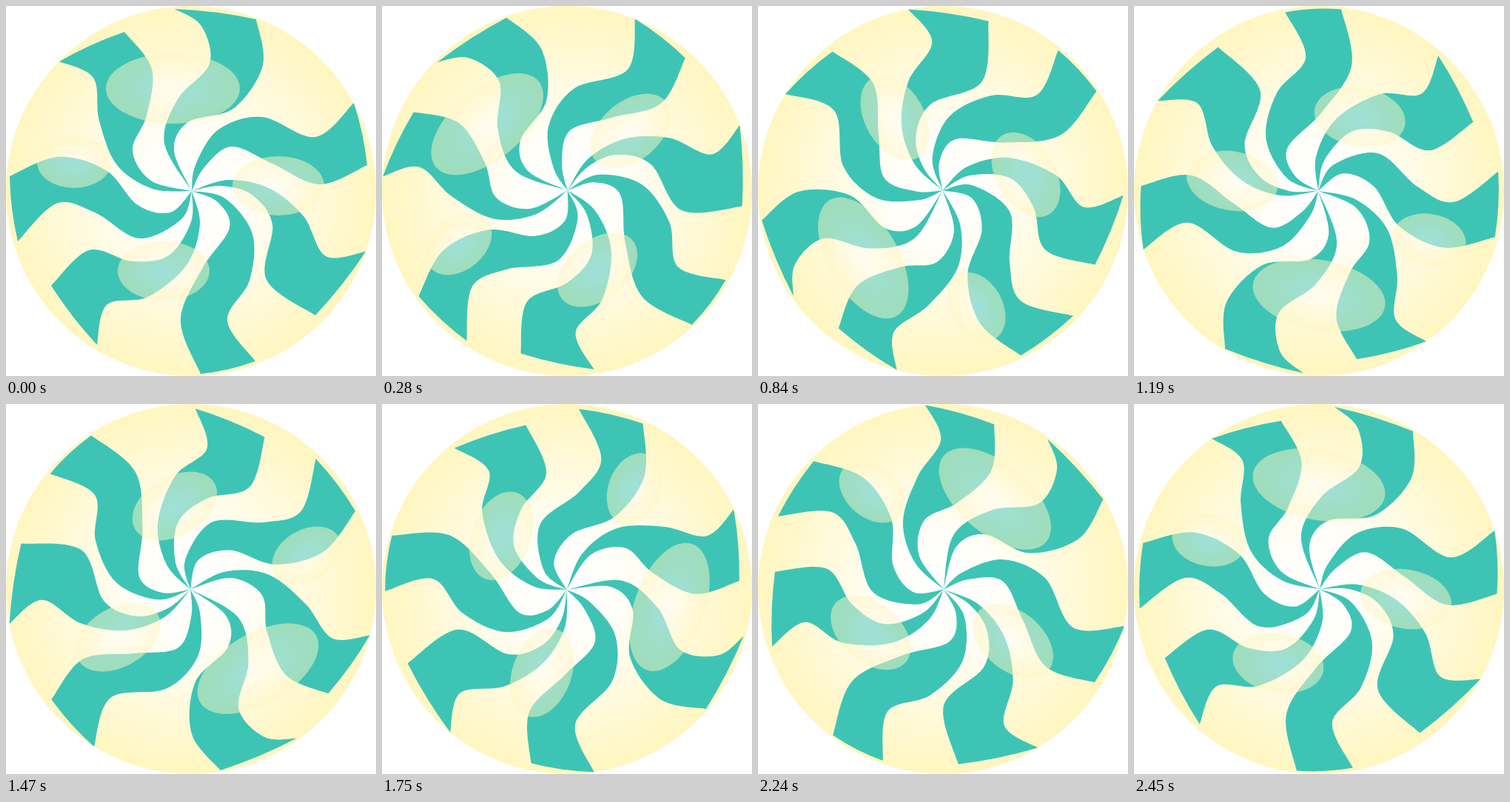
Recreate the animation shown at these times as an HTML page. Size 500 by 500 pixels, loop 2.52 s.

```html
<!DOCTYPE html>
<html lang="en">
<head>
<meta charset="utf-8">
<title>Spinning candy</title>
<style>
  html, body { margin: 0; width: 100%; height: 100%; overflow: hidden; background: #fff; }
  svg { display: block; width: 100vw; height: 100vh; }
</style>
</head>
<body>
<svg viewBox="0 0 500 500">
  <defs>
    <radialGradient id="cream">
      <stop offset="0" stop-color="#fff"/>
      <stop offset=".3" stop-color="#fffef8"/>
      <stop offset="1" stop-color="#fff6c0"/>
    </radialGradient>
    <radialGradient id="shine">
      <stop offset="0" stop-color="#fff"/>
      <stop offset="1" stop-color="#fff6c0"/>
    </radialGradient>
  </defs>
  <circle cx="250" cy="250" r="250" fill="url(#cream)"/>
  <g id="candy">
    <path id="swirl" fill="#3ec4b5"/>
    <g fill="url(#shine)" opacity=".5">
      <ellipse cx="225.500" cy="111.500" rx="90.500" ry="47.500"/>
      <ellipse cx="92" cy="211" rx="50" ry="35"/>
      <ellipse cx="368" cy="243" rx="62" ry="40"/>
      <ellipse cx="213" cy="358" rx="62" ry="40"/>
    </g>
  </g>
</svg>
<script>
  const FRAME_MS = 70, FRAMES = 36;
  const hub = [251, 250];

  // Two edges per stripe, each running from the rim towards the hub.
  const stripes = [
    ['228,4 264,27 275,78 232,126 214,185', '338,18 347,80 308,138 246,157 227,195'],
    ['72,75 118,97 126,155 150,215 198,247', '160,35 197,85 190,148 171,195 196,236'],
    ['5,230 70,204 135,222 178,269 222,279', '16,318 68,267 120,279 180,314 237,288'],
    ['61,378 112,330 170,345 220,337 250,292', '123,458 136,404 192,393 244,350 262,295'],
    ['263,497 236,425 265,355 302,300 286,265', '337,480 299,425 329,371 333,308 296,260'],
    ['418,418 352,370 360,295 332,255 290,243', '486,332 432,338 402,284 355,246 300,235'],
    ['488,215 424,241 360,213 305,190 268,218', '470,131 418,177 346,150 287,167 256,215']
  ];

  const parseEdge = text => [...text.split(' ').map(p => p.split(',').map(Number)), hub];

  // Catmull-Rom spline as cubic Bezier segments
  function spline(points) {
    const at = i => points[Math.max(0, Math.min(points.length - 1, i))];
    const handle = (p, from, to) => p.map((v, k) => v + (to[k] - from[k]) / 6);
    return points.slice(1).map((end, i) => {
      const start = at(i);
      return 'C' + [handle(start, at(i - 1), end), handle(end, at(i + 2), start), end].join(' ');
    }).join('');
  }

  function stripePath([first, second]) {
    const out = parseEdge(first).reverse(), back = parseEdge(second);
    const rimStart = out[out.length - 1], rimEnd = back[0];
    const bulge = rimStart.map((v, k) => 250 + ((v + rimEnd[k]) / 2 - 250) * 1.02);
    return `M${hub}${spline(out)}Q${bulge} ${rimEnd}${spline(back)}Z`;
  }

  document.getElementById('swirl').setAttribute('d', stripes.map(stripePath).join(''));

  const candy = document.getElementById('candy');
  function draw() {
    const step = Math.floor(performance.now() / FRAME_MS) % FRAMES;
    candy.setAttribute('transform', `rotate(${-step * 360 / FRAMES} 250 250)`);
    requestAnimationFrame(draw);
  }
  draw();
</script>
</body>
</html>
```
